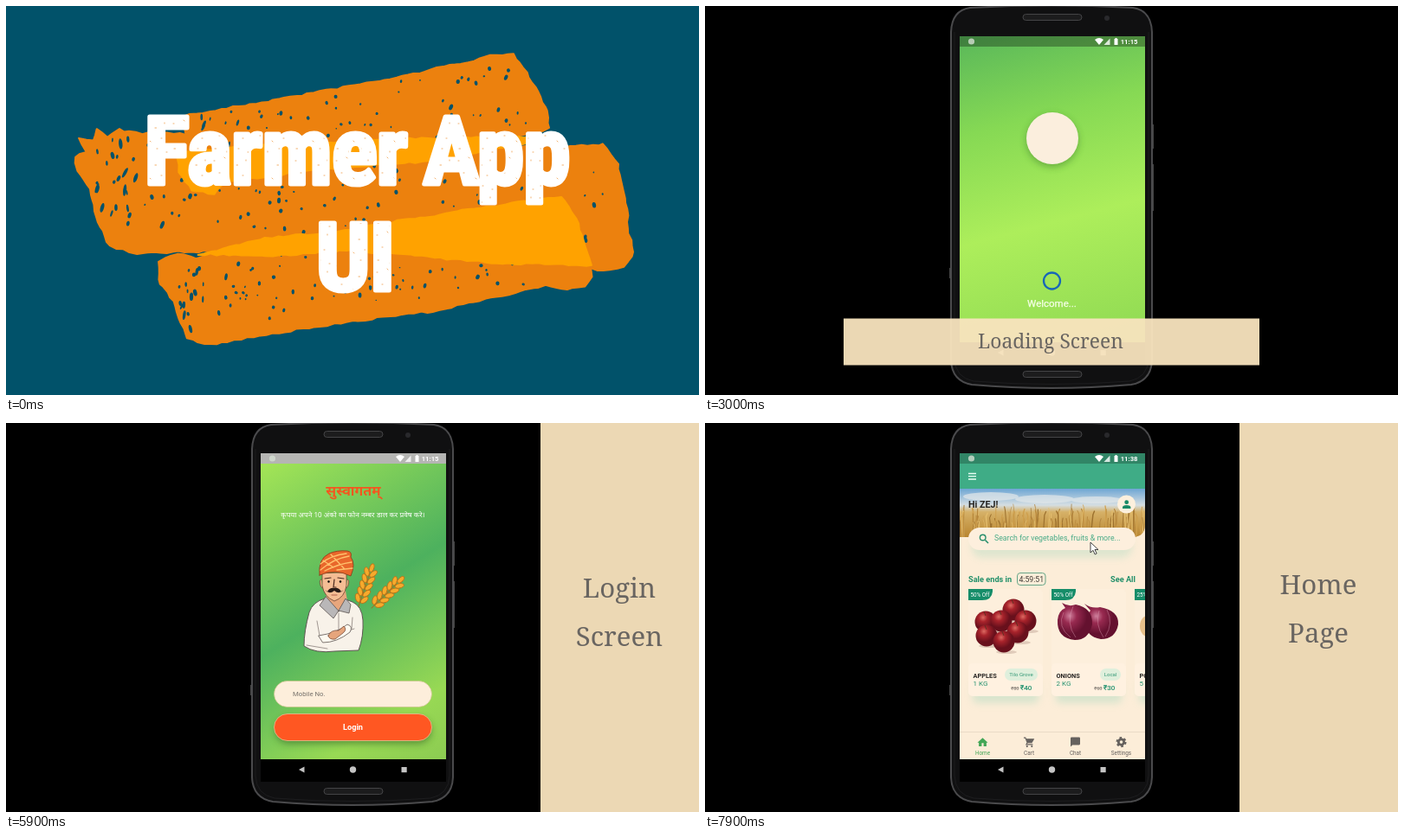
Write an HTML page that moves like this. It is 800 px wide and 450 px high and loops after 8 s.

```html
<!DOCTYPE html>
<html lang="en">
<head>
<meta charset="utf-8">
<title>Farmer App UI</title>
<style>
html, body { margin: 0; width: 100%; height: 100%; overflow: hidden; background: #000; }
svg { display: block; width: 100%; height: 100%; font-family: Roboto, sans-serif; }
.b { font-weight: 700; }
.mid { text-anchor: middle; }
.end { text-anchor: end; }
.serif { font-family: "Noto Serif", serif; fill: #696561; text-anchor: middle; }
.hindi { font-family: "Noto Sans Devanagari", "Noto Sans", sans-serif; text-anchor: middle; }
.title {
  font: 700 110px "Roboto Condensed", Roboto, sans-serif; font-stretch: 75%; letter-spacing: -1px; word-spacing: -6px;
  fill: url(#grit); stroke: #fff; stroke-width: 5; stroke-linejoin: round; paint-order: stroke; text-anchor: middle;
}
</style>
</head>
<body>
<svg viewBox="0 0 800 450">
<defs>
  <pattern id="grit" width="47" height="43" patternUnits="userSpaceOnUse">
    <rect width="47" height="43" fill="#fff"/>
    <path d="M5 7h1M17 3l1 1M31 12h1.5M42 6v1M11 21h1M25 27l1 1M38 24h1M6 36h1.5M20 39v1M33 36h1M44 40h1" stroke="#f3b06a" stroke-linecap="round"/>
  </pattern>
  <linearGradient id="loadBg" gradientUnits="userSpaceOnUse" x1="320" y1="30" x2="415" y2="389">
    <stop offset="0" stop-color="#5ab85a"/><stop offset=".3" stop-color="#86d954"/>
    <stop offset=".63" stop-color="#adee5b"/><stop offset="1" stop-color="#93dc54"/>
  </linearGradient>
  <linearGradient id="loginBg" gradientUnits="userSpaceOnUse" x1="294" y1="47" x2="508" y2="390">
    <stop offset="0" stop-color="#a4e556"/><stop offset=".47" stop-color="#4db15e"/>
    <stop offset=".82" stop-color="#98d954"/><stop offset="1" stop-color="#8ccb52"/>
  </linearGradient>
  <linearGradient id="field" x2="0" y2="1">
    <stop offset="0" stop-color="#6ea6d4"/><stop offset=".34" stop-color="#d5dee2"/>
    <stop offset=".48" stop-color="#d6b168"/><stop offset="1" stop-color="#b9852f"/>
  </linearGradient>
  <radialGradient id="apple" cx=".38" cy=".3">
    <stop offset="0" stop-color="#dd6a62"/><stop offset=".4" stop-color="#a8232b"/><stop offset="1" stop-color="#68101c"/>
  </radialGradient>
  <radialGradient id="onion" cx=".35" cy=".35">
    <stop offset="0" stop-color="#cf7f9c"/><stop offset=".4" stop-color="#982a50"/><stop offset="1" stop-color="#64112f"/>
  </radialGradient>
  <filter id="soft" x="-30%" y="-60%" width="160%" height="240%"><feGaussianBlur stdDeviation="4"/></filter>
  <clipPath id="screen"><rect x="294" y="35" width="214" height="354"/></clipPath>
  <clipPath id="photo"><path d="M294 76H508V117Q508 132 493 132H294Z"/></clipPath>
  <g id="wheat"></g>
</defs>

<g id="phone">
  <path d="M516 137h2v28h-2zM516 183h2v54h-2zM282 303h2v12h-2z" fill="#444"/>
  <path d="M306 2Q400 -3 494 2Q515 5 516 30V410Q515 434 492 438Q400 446 308 438Q285 434 284 410V30Q285 5 306 2Z" fill="#101011" stroke="#4a4a4c" stroke-width="2"/>
  <path d="M288 30V408Q289 430 310 434Q400 441 490 434Q511 430 512 408V30" fill="none" stroke="#1d1d1f"/>
  <g fill="#1c1c1d" stroke="#444446">
    <rect x="367" y="9.5" width="68" height="7" rx="3.5"/>
    <rect x="367" y="422.5" width="68" height="7" rx="3.5"/>
  </g>
  <circle cx="464" cy="14" r="3" fill="#29292c"/>
  <rect x="294" y="35" width="214" height="380" fill="#000"/>
  <g fill="#c4c4c4">
    <path d="M344.500 397.500v7l-6.500 -3.500z"/><circle cx="400.500" cy="401" r="3.700"/><rect x="456.500" y="398" width="6.200" height="6.200"/>
  </g>
</g>

<g id="loading" clip-path="url(#screen)">
  <rect x="294" y="35" width="214" height="354" fill="url(#loadBg)"/>
  <rect x="294" y="35" width="214" height="12" fill="#000" opacity=".3"/>
  <circle cx="401" cy="156" r="30" fill="#2c6a20" opacity=".45" filter="url(#soft)"/>
  <circle cx="401" cy="153" r="30" fill="#fbeedd"/>
  <circle cx="400.500" cy="318" r="9.500" fill="none" stroke="#1766b8" stroke-width="2.300"/>
  <text x="400.500" y="348" class="mid" font-size="11.500" fill="#f6ffe9" stroke="#f6ffe9" stroke-width=".25">Welcome...</text>
</g>

<g id="login" clip-path="url(#screen)">
  <rect x="294" y="35" width="214" height="354" fill="url(#loginBg)"/>
  <rect x="294" y="35" width="214" height="12" fill="#b5b5b3"/>
  <text x="401" y="84" class="hindi b" font-size="16" fill="#f4561f">सुस्वागतम्</text>
  <text x="400.500" y="109" class="hindi" font-size="8.350" fill="#fff">कृपया अपने 10 अंको का फोन नम्बर डाल कर प्रवेष करे।</text>
  <g id="farmer" stroke-linejoin="round" stroke-linecap="round">
    <use href="#wheat"/>
    <path d="M370 198L369 208L383 219L394 206L392 194Z" fill="#e8a67c"/>
    <path d="M368 203Q354 207 350 219Q344 241 344 258Q357 267 380 264L407 263Q413 247 412 228Q411 212 400 207L392 204L384 218Z" fill="#f8f2e9" stroke="#5d5552"/>
    <path d="M369 201L362 211L378 226L384 217L396 220L398 210L392 203L384 217Z" fill="#b9b7b8" stroke="#5d5552" stroke-width=".8"/>
    <path d="M384 220V240M359 229L362 246M400 225L399 238M347 257L371 261M368 249L402 238" fill="none" stroke="#8b817b" stroke-width=".8"/>
    <path d="M361 246Q382 243 394 233Q401 235 397 242Q382 254 366 254Z" fill="#fffaf0" stroke="#5d5552" stroke-width=".8"/>
    <path d="M372 246Q375 239 384 240L390 235Q394 239 389 243L380 250Q373 251 372 246Z" fill="#e6a57c" stroke="#6e4331" stroke-width=".7"/>
    <path d="M365 174V188Q367 201 379 206Q391 202 393 188V173Z" fill="#f4bd94" stroke="#6e4331" stroke-width=".8"/>
    <path d="M364 181q-3 0-1 7l2 3M394 181q3 0 1 7l-2 3" fill="#eba77d" stroke="#6e4331" stroke-width=".7"/>
    <path d="M368 180l7-1M383 179l7 1M379 181l-1 9h3" fill="none" stroke="#49281f" stroke-width="1.200"/>
    <circle cx="372.500" cy="183.500" r="1.200"/><circle cx="386" cy="183.500" r="1.200"/>
    <path d="M379 191Q374 190 371 195L368 193Q373 199 379 194Q385 199 390 193L387 195Q384 190 379 191Z" fill="#291b17"/>
    <path d="M376 199h6" stroke="#b15f4b"/>
    <path d="M362 176Q360 157 373 151Q382 147 394 148Q400 149 398 155Q404 163 398 177Q380 168 362 176Z" fill="#e9672b" stroke="#8d3717" stroke-width=".8"/>
    <path d="M363 170Q378 157 396 154M363 163Q375 153 393 151M368 171Q384 163 399 161M382 170L400 168M366 159L378 167M375 152L390 168" fill="none" stroke="#ffc06c" stroke-width="1.300"/>
  </g>
  <g id="input">
    <rect x="309.500" y="298.500" width="182" height="30" rx="15" fill="#fdeedb" stroke="#cfc68d" stroke-width=".7"/>
    <text x="331" y="316" font-size="7.800" fill="#76716a">Mobile No.</text>
  </g>
  <g id="button">
    <rect x="311" y="341" width="180" height="30" rx="15" fill="#2c5c20" opacity=".55" filter="url(#soft)"/>
    <rect x="309.500" y="336.500" width="182" height="31" rx="15.500" fill="#ff5722" stroke="#e5c094" stroke-width=".8"/>
    <text x="400.500" y="355" class="mid b" font-size="9.200" fill="#fff">Login</text>
  </g>
</g>

<g id="home" clip-path="url(#screen)">
  <rect x="294" y="35" width="214" height="354" fill="#fcedd8"/>
  <rect x="294" y="35" width="214" height="12" fill="#318566"/>
  <rect x="294" y="47" width="214" height="29" fill="#3fac86"/>
  <path d="M304 58.500h9M304 61.700h9M304 65h9" stroke="#e7fff4" stroke-width="1.300"/>
  <g clip-path="url(#photo)">
    <rect x="294" y="76" width="214" height="56" fill="url(#field)"/>
    <g fill="#e3e8ea" opacity=".7">
      <ellipse cx="330" cy="85" rx="32" ry="5"/><ellipse cx="392" cy="88" rx="34" ry="5"/><ellipse cx="452" cy="89" rx="30" ry="4"/>
    </g>
    <g id="stalks" fill="none" stroke-linecap="round"></g>
  </g>
  <text x="304" y="98" class="b" font-size="10.700" fill="#272522">Hi ZEJ!</text>
  <circle cx="486.500" cy="94" r="10.500" fill="#fdf0dd"/>
  <path d="M482 99v-1.500q0-2.500 4.700-2.500t4.700 2.500v1.500z" fill="#188a66"/><circle cx="486.700" cy="91.700" r="2.400" fill="#188a66"/>
  <rect x="308" y="131" width="185" height="25" rx="12" fill="#b9ddc4" opacity=".45" filter="url(#soft)"/>
  <rect x="304" y="121" width="193" height="26" rx="13" fill="#fdefdd"/>
  <path d="M323.500 135.500l3.500 3.500" stroke="#278e6c" stroke-width="1.600"/><circle cx="320.700" cy="132.500" r="3.300" fill="none" stroke="#278e6c" stroke-width="1.400"/>
  <text x="334" y="136.300" font-size="8.750" fill="#48ab87">Search for vegetables, fruits &amp; more...</text>
  <g font-size="9.200" fill="#208f69">
    <text x="304" y="183.500" class="b">Sale ends in</text>
    <text x="497" y="183.500" class="b end">See All</text>
    <rect x="360.500" y="173.500" width="32.500" height="14" rx="3.500" fill="none" stroke="#559f81" stroke-width=".9"/>
    <text id="timer" x="376.800" y="183.500" class="mid" font-size="8.700" fill="#3f3b37"></text>
  </g>
  <g id="cards"></g>
  <g id="apples" fill="url(#apple)"></g>
  <g fill="url(#onion)">
    <path d="M438 209q8 6 18 4q22 4 21 20q-3 17-20 17q-18-3-17-19q1-10 5-14z"/>
    <path d="M412 208q8 5 16 2q20 4 19 23q-4 18-20 18q-21-2-20-23q1-11 9-14z"/>
    <path d="M414 219q-8 17 8 29M425 212q-9 20 3 36M455 217q-5 16 5 31M464 216q8 16-2 31" fill="none" stroke="#dda0b5" stroke-width=".6" opacity=".7"/>
  </g>
  <path d="M294 357.500h214" stroke="#eadbc7"/>
  <g id="tabs" class="mid" font-size="6.400"></g>
  <path id="cursor" d="M0 0V12L3 9.300L5.200 14L7.200 13L5 8.500H9Z" fill="#fff" stroke="#333" stroke-width=".9"/>
</g>

<g id="status" fill="#fff">
  <circle cx="307.500" cy="41" r="3.600" fill="#d5dfd2" opacity=".8"/>
  <path d="M450 39q5-4 10 0l-5 6z"/><path d="M460.500 45h7v-7.500z" opacity=".8"/><path d="M472.500 38h1v-1h2v1h1v7h-4z"/>
  <text id="clock" x="499.500" y="43.700" class="end b" font-size="7.700"></text>
</g>

<g id="banner">
  <rect x="160" y="361.500" width="480" height="54" fill="#f8e4be" opacity=".95"/>
  <text id="bannerText" x="399" y="396" class="serif" font-size="22.800">Loading Screen</text>
</g>
<g id="panel">
  <rect x="617" width="203" height="450" fill="#ecd8b4"/>
  <g id="panelText" class="serif" font-size="31.200"><text id="line1" x="708"></text><text id="line2" x="708"></text></g>
</g>

<g id="intro">
  <rect width="800" height="450" fill="#01526a"/>
  <g id="brush"></g>
  <text x="405" y="206" class="title">Farmer App</text>
  <text x="403" y="329" class="title">UI</text>
</g>
</svg>
<script>
const $ = id => document.getElementById(id);
let seed = 7;
const rand = (a = 0, b = 1) => {
  seed = (seed * 16807) % 2147483647;
  return a + (b - a) * seed / 2147483647;
};
const repeat = (n, make) => Array.from({ length: n }, (_, i) => make(i)).join('');

// Polygon with torn edges, from "x,y x,y ..."
function rough(corners, fill) {
  const pts = corners.split(' ').map(p => p.split(',').map(Number));
  const out = [];
  pts.forEach(([x, y], i) => {
    const [u, v] = pts[(i + 1) % pts.length];
    const steps = Math.max(1, Math.round(Math.hypot(u - x, v - y) / 7));
    for (let k = 0; k < steps; k++) {
      const f = k / steps;
      out.push((x + (u - x) * f + rand(-1.3, 1.3)).toFixed(1) + ',' + (y + (v - y) * f + rand(-1.3, 1.3)).toFixed(1));
    }
  });
  return `<polygon points="${out.join(' ')}" fill="${fill}" stroke="${fill}" stroke-width="2" stroke-linejoin="round"/>`;
}

// Holes along a stroke: denser and larger towards its left end
function holes(n, x0, x1, y0, y1, half) {
  return repeat(n, () => {
    const f = rand() ** 1.5, x = x0 + (x1 - x0) * f, y = y0 + (y1 - y0) * f + rand(-half, half);
    const r = rand(.8, 2.2), long = f < .13 ? rand(1, 3.6) : rand(.8, 1.7);
    return `<ellipse rx="${r}" ry="${r * long}" transform="translate(${x} ${y}) rotate(${rand(-15, 30)})"/>`;
  });
}

const orange = '#ec810e', light = '#ffa200';
$('brush').innerHTML =
  rough('205,127 235,122 335,104 450,83 560,58 585,56 598,70 618,105 627,128 626,142 500,172 250,215 215,212', orange) +
  rough('79,174 92,170 84,153 100,156 105,143 116,151 130,143 150,147 300,150 560,161 644,163 690,160 706,182 717,235 718,264 723,272 723,290 714,303 690,306 670,303 560,298 400,282 290,284 200,284 150,287 120,278 105,250 98,212 82,190', orange) +
  rough('176,296 190,288 205,286 220,291 300,270 400,258 640,220 655,240 677,297 676,312 667,324 648,328 622,324 560,338 500,352 400,365 300,380 235,392 210,385 198,355 187,330 177,322', orange) +
  '<g fill="#01526a">' + holes(85, 225, 600, 160, 100, 36) + holes(130, 105, 705, 200, 235, 50) + holes(95, 200, 645, 340, 280, 36) + '</g>' +
  rough('198,170 300,160 460,154 626,151 600,160 480,180 340,192 255,203 240,217 215,213 200,192', light) +
  rough('222,287 300,269 370,262 520,238 640,220 658,245 676,300 560,297 480,290 400,283 300,289', light);

const stem = (x, y, angle, n) => `<g transform="translate(${x} ${y}) rotate(${angle})">
  <path d="M0 0V${-n * 8}" stroke="#a9691c"/>` + repeat(n, i =>
  [-1, 1].map(s => `<ellipse rx="2.700" ry="5.200" transform="translate(${s * 4} ${-9 - i * 8}) rotate(${s * 32})" fill="#f6aa2c" stroke="#b96f17" stroke-width=".8"/>`).join('')) +
  `<ellipse cy="${-n * 8 - 7}" rx="2.500" ry="5" fill="#f6aa2c" stroke="#b96f17" stroke-width=".8"/></g>`;
$('wheat').innerHTML = stem(407, 212, 19, 5) + stem(422, 214, 46, 5);

$('stalks').innerHTML = repeat(130, () => {
  const x = rand(294, 508), y = rand(98, 122), color = ['#e3bd6d', '#b5853a', '#cf9f4c', '#9d712e'][Math.floor(rand(0, 4))];
  return `<path d="M${x} 134L${x + rand(-3, 3)} ${y}l${rand(-2, 2)} -4" stroke="${color}" stroke-width="${rand(.5, 1.5)}"/>`;
});

const card = (x, off, name, weight, tag, tagWidth, old, price) => `<g transform="translate(${x} 0)">
  <rect x="5" y="300" width="76" height="24" rx="5" fill="#b4dcc3" opacity=".5" filter="url(#soft)"/>
  <rect y="192" width="86" height="124" rx="5" fill="#fdefdc"/>
  <rect y="278" width="86" height="38" rx="5" fill="#fff1e0"/>
  <path d="M0 192H28V195Q27 205 16 205H0Z" fill="#168d69"/>
  <text x="2.500" y="200.700" font-size="6.300" fill="#fff">${off}% Off</text>
  <text x="5.500" y="294.500" class="b" font-size="7.400" fill="#292623">${name}</text>
  <text x="5.500" y="304" font-size="8" fill="#259270">${weight} KG</text>
  <rect x="${80 - tagWidth}" y="284" width="${tagWidth}" height="14" rx="7" fill="#dfefdc"/>
  <text x="${80 - tagWidth / 2}" y="293" class="mid" font-size="6.100" fill="#339875">${tag}</text>
  <text x="58.500" y="308.500" class="end" font-size="5.600" fill="#77716a" text-decoration="line-through">₹${old}</text>
  <text x="60" y="309" font-size="8" fill="#168d69" stroke="#168d69" stroke-width=".2">₹${price}</text>
</g>`;
$('cards').innerHTML =
  card(304, 50, 'APPLES', 1, 'Tilo Grove', 38, 80, 40) +
  card(400, 50, 'ONIONS', 2, 'Local', 24, 60, 30) +
  card(496, 25, 'POTATOES', 5, 'Local', 24, 40, 30) +
  '<ellipse cx="513" cy="235" rx="11" ry="13" fill="#e7c08a"/>';

$('apples').innerHTML = [[356, 216], [324, 230], [370, 229], [342, 229], [325, 246], [361, 242], [345, 253]]
  .map(([x, y]) => `<ellipse cx="${x + 3}" cy="${y + 12}" rx="12" ry="2" fill="#6c3d33" opacity=".2"/>
    <circle cx="${x}" cy="${y}" r="12.500"/><path d="M${x} ${y - 7}l-2 -5" stroke="#563422" stroke-width=".9"/>`).join('');

const tab = (x, label, color, icon) => `<g fill="${color}"><g transform="translate(${x - 6.6} 362.500) scale(.55)">${icon}</g>
  <text x="${x}" y="383.500">${label}</text></g>`;
const grey = '#65615e';
$('tabs').innerHTML =
  tab(320.5, 'Home', '#43a656', '<path d="M10 21v-7h4v7h6v-8h3L12 3 1 13h3v8z"/>') +
  tab(374, 'Cart', grey, `<path d="M1 3h3.500l4 10h9l4-7H6M8.500 13l-2 4H20" fill="none" stroke="${grey}" stroke-width="2.200"/><path d="M6 6h15l-4 7H9z"/><circle cx="8" cy="21" r="2"/><circle cx="18" cy="21" r="2"/>`) +
  tab(427.5, 'Chat', grey, '<path d="M4 2h16a2 2 0 0 1 2 2v12a2 2 0 0 1-2 2H6l-4 4V4a2 2 0 0 1 2-2z"/>') +
  tab(480.5, 'Settings', grey, `<g fill="none" stroke="${grey}"><circle cx="12" cy="12" r="5.800" stroke-width="5"/><circle cx="12" cy="12" r="9" stroke-width="4" stroke-dasharray="4.700 4.725"/></g>`);

const clamp = v => Math.min(1, Math.max(0, v));
const span = (t, from, to) => clamp((t - from) / (to - from));
const show = (id, on) => $(id).style.display = on ? '' : 'none';
const move = (id, x, y) => $(id).setAttribute('transform', `translate(${x} ${y})`);
const fade = (id, v) => $(id).setAttribute('opacity', v);
function caption(a, b, y) {
  [a, b].forEach((text, i) => {
    const line = $('line' + (i + 1));
    line.textContent = text;
    line.setAttribute('y', y + i * 55.5);
  });
}

function draw() {
  const t = performance.now() % 8000;
  const scene = t < 1000 ? 'intro' : t < 4700 ? 'loading' : t < 6500 ? 'login' : 'home';
  for (const id of ['intro', 'loading', 'login', 'home']) show(id, id === scene);
  show('banner', scene === 'loading');
  show('panel', scene === 'login' || scene === 'home');
  $('clock').textContent = scene === 'home' ? '11:38' : '11:15';

  const rise = span(t, 1000, 1800);
  fade('banner', rise);
  move('banner', 0, 20 * (1 - rise));
  fade('bannerText', span(t, 1400, 1800));

  const away = (1 - span(t, 4700, 5400)) ** 3;
  move('farmer', 0, 45 * away);
  move('input', -120 * away, 0);
  move('button', 120 * away, 0);

  const home = scene === 'home', enter = home ? span(t, 6500, 7300) : 1;
  fade('panel', enter);
  move('panel', 20 * (1 - enter), 0);
  fade('panelText', home ? span(t, 7000, 7600) : 1);
  if (home) caption('Home', 'Page', 198); else caption('Login', 'Screen', 202);

  $('timer').textContent = t < 7400 ? '4:59:52' : '4:59:51';
  const drift = (t - 6900) / 1000;
  move('cursor', 452.5 - 7.5 * drift, 128 + 10 * drift);
  requestAnimationFrame(draw);
}
draw();
</script>
</body>
</html>
```
